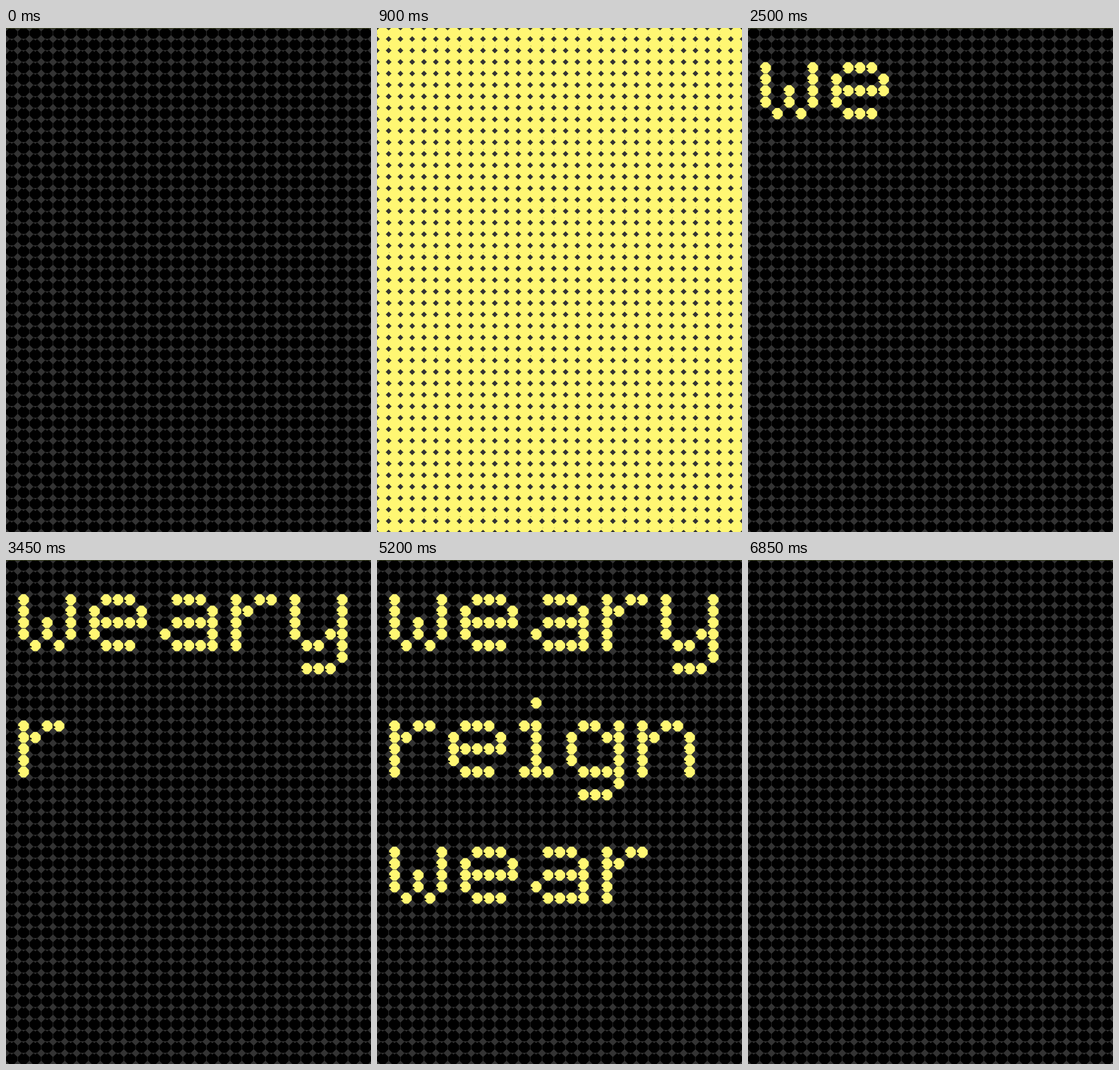
An HTML page that plays this animation: 580x800 px, repeating every 7050 ms.

```html
<!DOCTYPE html>
<html lang="en">
<head>
<meta charset="utf-8">
<style>
  html, body { margin: 0; width: 100%; height: 100%; overflow: hidden; background: #333; }
  svg { display: block; width: 580px; height: 800px; }
  text { font: 400 50px Inter, Roboto, sans-serif; letter-spacing: .5px; text-anchor: middle; font-variant-ligatures: no-contextual; }
</style>
</head>
<body>
<svg viewBox="0 0 580 800">
  <rect width="580" height="800" fill="#333"/>
  <path id="unlit" fill="#000"/>
  <rect width="580" height="1" fill="#3c4420"/>
  <path id="lit" fill="#fff773" stroke="#fff773" stroke-width="0"/>
  <g id="card">
    <rect width="580" height="800" fill="#fff773"/>
    <text id="line1" x="291" y="394.5"></text>
    <text id="line2" x="291" y="452"></text>
  </g>
</svg>
<script>
const LOOP = 7050, COLS = 31, ROWS = 44;
const PITCH_X = 18.75, PITCH_Y = 18.22;
const el = id => document.getElementById(id);

// Each glyph: rows above the x-height, then its rows of dots.
const GLYPHS = {
  a: [0, '.###. ....# .#### #...# .####'],
  e: [0, '.###. #...# ##### #.... .###.'],
  g: [0, '.##.# #..## #...# #...# .#### ....# .###.'],
  i: [2, '.#. ... ##. .#. .#. .#. ###'],
  l: [2, '##. .#. .#. .#. .#. .#. ###'],
  n: [0, '#.##. ##..# #...# #...# #...#'],
  o: [0, '.###. #...# #...# #...# .###.'],
  r: [0, '#.## ##.. #... #... #...'],
  w: [0, '#...# #...# #.#.# #.#.# .#.#.'],
  y: [0, '#...# #...# #...# #..## .##.# ....# .###.']
};
const WORDS = ['weary', 'reign', 'weary', 'lion'];

// Octagonal disc with a small pivot notch at the left or the top.
function disc(col, row, lit) {
  const x = 9.1 + col * PITCH_X, y = 8.4 + row * PITCH_Y;
  const w = lit ? 8.6 : 9, h = lit ? 8.8 : 8.7, c = 5.6;
  const points = [[c - w, -h]];
  if (!lit) points.push([-2, -h], [0, 2 - h], [2, -h]);
  points.push([w - c, -h], [w, c - h], [w, h - c], [w - c, h], [c - w, h], [-w, h - c]);
  if (lit) points.push([3 - w, 2.8], [2.6 - w, 1], [-w, 0]);
  points.push([-w, c - h]);
  return 'M' + points.map(([px, py]) => (x + px).toFixed(1) + ' ' + (y + py).toFixed(1)).join('L') + 'Z';
}

function fillRows(count, lit) {
  let d = '';
  for (let row = 0; row < count; row++)
    for (let col = 0; col < COLS; col++) d += disc(col, row, lit);
  return d;
}

function glyphPath(char, left, top) {
  const [rise, shape] = GLYPHS[char];
  let d = '';
  shape.split(' ').forEach((line, r) => [...line].forEach((dot, c) => {
    if (dot === '#') d += disc(left + c, top - rise + r, true);
  }));
  return d;
}

const letters = WORDS.flatMap((word, n) => {
  let left = 1;
  return [...word].map((char, i) => {
    const d = glyphPath(char, left, 3 + 11 * n);
    left += GLYPHS[char][1].split(' ')[0].length + 1;
    return { d, start: 2300 + 1150 * n + 200 * i };
  });
});

function setAttr(id, name, value) {
  if (el(id).getAttribute(name) !== String(value)) el(id).setAttribute(name, value);
}

function draw(t) {
  let d = '';
  if (t < 1000) d = fillRows(Math.min(ROWS, Math.round(5.5 * Math.floor(t / 100))), true);
  else if (t >= 2500 && t < 6850) d = letters.filter(l => t >= l.start).map(l => l.d).join('');
  setAttr('lit', 'd', d);
  setAttr('lit', 'stroke-width', t >= 900 && t < 1000 ? 3 : 0);
  setAttr('card', 'visibility', t >= 1000 && t < 2500 ? 'visible' : 'hidden');
  const copy = t < 1100 ? ['', ''] : t < 1800 ? ['New exhibition', 'in the hall'] : ['22/6 - 9/7', '2017'];
  copy.forEach((line, i) => {
    const node = el('line' + (i + 1));
    if (node.textContent !== line) node.textContent = line;
  });
}

el('unlit').setAttribute('d', fillRows(ROWS, false));
const begin = performance.now();
function tick() {
  draw((performance.now() - begin) % LOOP);
  requestAnimationFrame(tick);
}
tick();
</script>
</body>
</html>
```
